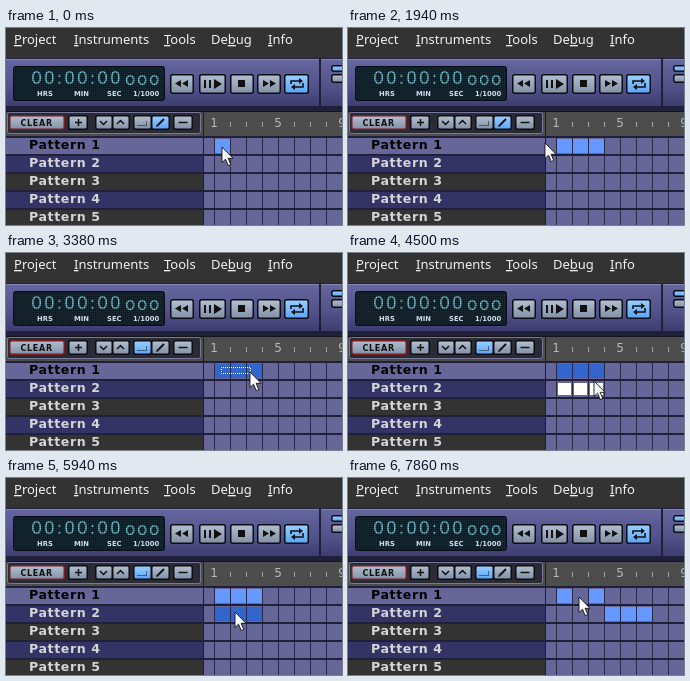
Animation of 336 by 197 pixels, one loop 8 s. Source, as an HTML page:

```html
<!DOCTYPE html>
<html lang="en">
<head>
<meta charset="utf-8">
<title>Pattern editor</title>
<style>
html, body { margin: 0; width: 100%; height: 100%; overflow: hidden; background: #333; }
svg { display: block; width: 336px; height: 197px; }
.menu { font: 13px "Noto Sans", "Open Sans", sans-serif; fill: #f2f2f2; }
.row { font: bold 12.6px "DejaVu Sans", sans-serif; letter-spacing: .6px; }
.label { font: bold 6.8px "DejaVu Sans", sans-serif; fill: #cfdcec; }
.clear { font: bold 8px "DejaVu Sans", sans-serif; letter-spacing: .7px; fill: #111; }
.bar { font: 12px "DejaVu Sans", sans-serif; fill: #b8b8b8; text-anchor: middle; }
.lcd { font-family: "DejaVu Sans", sans-serif; fill: url(#dots); }
</style>
</head>
<body>
<svg id="stage" viewBox="0 0 336 197" xmlns="http://www.w3.org/2000/svg">
  <defs>
    <linearGradient id="panel" x2="0" y2="1">
      <stop stop-color="#6666a0"/><stop offset=".6" stop-color="#525289"/><stop offset="1" stop-color="#3d3d70"/>
    </linearGradient>
    <linearGradient id="button" x2="0" y2="1">
      <stop stop-color="#b4c0d0"/><stop offset="1" stop-color="#8290a6"/>
    </linearGradient>
    <linearGradient id="active" x2="0" y2="1">
      <stop stop-color="#9cd0ff"/><stop offset="1" stop-color="#5aa4f8"/>
    </linearGradient>
    <pattern id="dots" width="2" height="2" patternUnits="userSpaceOnUse">
      <rect width="2" height="2" fill="#35767f"/><rect width="1.3" height="1.3" fill="#83d6dc"/>
    </pattern>
    <pattern id="mesh" width="2" height="2" patternUnits="userSpaceOnUse">
      <rect width="2" height="2" fill="#101c26"/><rect width="1" height="1" fill="#1c2d38"/>
    </pattern>
  </defs>
  <g id="base"></g>
  <g id="tools"></g>
  <g id="cells"></g>
  <rect id="lasso" fill="none" stroke="#fff" stroke-dasharray="1 1" stroke-dashoffset=".5"/>
  <path id="cursor" d="M0 0V15.5L3.5 12.2L6.2 18.6L8.8 17.5L6.1 11.3H11Z" fill="#fff" stroke="#111" stroke-width=".9" stroke-linejoin="round"/>
</svg>
<script>
const $ = id => document.getElementById(id);
const rect = (x, y, w, h, fill, extra = '') =>
  `<rect x="${x}" y="${y}" width="${w}" height="${h}" fill="${fill}" ${extra}/>`;
const text = (x, y, s, cls, extra = '') => `<text x="${x}" y="${y}" class="${cls}" ${extra}>${s}</text>`;
const path = (d, fill = '#111', extra = '') => `<path d="${d}" fill="${fill}" ${extra}/>`;
const line = (d, color = '#111', width = 1) => path(d, 'none', `stroke="${color}" stroke-width="${width}"`);
const button = (x, y, w, h, fill = 'url(#button)', edge = '#0c0c14') =>
  rect(x + .75, y + .75, w - 1.5, h - 1.5, fill, `rx="2" stroke="${edge}" stroke-width="1.5"`);

function menuBar() {
  const items = [[8, '', 'P', 'roject'], [68, '', 'I', 'nstruments'], [158, '', 'T', 'ools'],
    [205, 'De', 'b', 'ug'], [262, '', 'I', 'nfo']];
  return rect(0, 0, 336, 31, '#333') + items.map(([x, before, key, after]) =>
    text(x, 16, `${before}<tspan text-decoration="underline">${key}</tspan>${after}`, 'menu')).join('');
}

function player() {
  let out = rect(0, 30, 336, 53, '#20203a') + rect(0, 31, 313, 47, 'url(#panel)') +
    rect(0, 31, 313, 1, '#8585b6') + rect(315, 31, 21, 47, 'url(#panel)') +
    rect(315, 31, 21, 1, '#8585b6');
  out += rect(7.5, 38.5, 151, 34, 'url(#mesh)', 'rx="2" stroke="#080d18"') +
    text(25, 56, '00:00:00', 'lcd', 'font-size="17.5" letter-spacing="1.6"') +
    text(119, 57, 'ooo', 'lcd', 'font-size="17" letter-spacing="1.6"');
  [[31, 'HRS'], [68, 'MIN'], [101, 'SEC'], [127, '1/1000']].forEach(([x, s]) => out += text(x, 68, s, 'label'));

  [[164, 24], [193, 27], [224, 24], [251, 24], [278, 25]].forEach(([x, w], i) =>
    out += button(x, 46, w, 20, i === 4 ? 'url(#active)' : 'url(#button)'));
  out += path('M175 52v7l-6-3.500zM182 52v7l-6-3.500z') +
    path('M198 52h2v8h-2zM203 52h2v8h-2zM208 51v10l8-5z') +
    rect(232, 52, 7, 7, '#111') +
    path('M257 52v7l6-3.500zM264 52v7l6-3.500z') +
    line('M285 56v-3h9M297 55v4h-9', '#111', 1.6) +
    path('M293 50l4 3l-4 3zM289 56l-4 3l4 3z');
  return out + button(325, 37, 16, 7, 'url(#active)') + button(325, 46, 16, 9);
}

function toolbar() {
  return rect(0, 83, 197, 26, '#4d4d4d') + rect(0, 83, 336, 1, '#15151f') +
    rect(1.5, 84.5, 193, 21, '#2b2b36', 'rx="2" stroke="#77779a"') +
    button(3, 87, 56, 15, 'url(#button)', '#7a1c22') + text(14.5, 98, 'CLEAR', 'clear') +
    button(62, 87, 20, 15) + line('M69 94.5h7M72.500 91v7', '#111', 1.5) +
    button(89, 87, 18, 15) + button(106, 87, 18, 15) +
    line('M94 93l3.500 3.500l3.500-3.500M111 96l3.500-3.500l3.500 3.500', '#111', 1.5) +
    button(167, 87, 20, 15) + line('M172.500 94.5h9', '#111', 1.5);
}

function rows() {
  let out = '';
  for (let i = 0; i < 5; i++) {
    const y = 109 + 18 * i;
    out += rect(0, y, 197, 18, i ? (i % 2 ? '#333366' : '#333') : '#666699') +
      text(23, y + 12, 'Pattern ' + (i + 1), 'row', `fill="${i ? '#d5d5d8' : '#000'}"`);
  }
  return out;
}

function grid() {
  let out = rect(197, 84, 139, 25, '#4d4d4d') + rect(197, 109, 139, 88, '#666699') + rect(197, 84, 1, 113, '#1d1d2c');
  for (let i = 0; i < 9; i++) {
    const x = 208 + 16 * i;
    out += rect(x, 110, 1, 87, '#29294a');
    out += i % 4 ? rect(x, 94, 1, 5, '#a0a0a0') : text(x, 99, i + 1, 'bar');
  }
  for (let y = 108; y < 197; y += 18) out += rect(0, y, 336, 2, '#20203a');
  return out;
}

$('base').innerHTML = menuBar() + player() + toolbar() + rows() + grid();

// time, x, y of the pointer tip
const route = [
  [0, 216, 119], [340, 216, 119], [660, 230, 118], [980, 232, 118], [1300, 246, 118], [1620, 249, 117],
  [1940, 197, 115], [2100, 170, 106], [2260, 150, 99], [2580, 145, 98],
  [3060, 215, 114], [3380, 244, 119], [3700, 246, 118], [3860, 246, 117], [4020, 246, 117],
  [4500, 246, 128], [4660, 246, 130], [4820, 246, 130], [5140, 247, 132], [5460, 215, 138],
  [5620, 214, 138], [5940, 229, 134], [6100, 231, 134], [6580, 268, 133], [6740, 274, 133],
  [6900, 274, 132], [7060, 272, 132], [7540, 235, 120], [7700, 231, 119], [8000, 231, 119]
];

function pointer(t) {
  const i = route.findIndex(p => p[0] > t);
  const [t0, x0, y0] = route[i - 1], [t1, x1, y1] = route[i];
  const k = (t - t0) / (t1 - t0);
  return [x0 + (x1 - x0) * k, y0 + (y1 - y0) * k].map(Math.round);
}

// Rubber bands: start and release time, and the corner where each begins
const lassos = [
  { from: 3060, to: 3540, x: 215, y: 114 },
  { from: 5140, to: 5620, x: 247, y: 132 }
];

const LIT = '#6699ff', PICKED = '#3366cc', GHOST = '#fff';
const cell = (col, row, fill) => rect(209 + 16 * col, 111 + 18 * row, 15, 14, fill);
const ghosts = (col, row) => [0, 1, 2].map(i =>
  rect(210 + 16 * (col + i), 112 + 18 * row, 13, 12, GHOST)).join('');

// A cell is picked once the band reaches it, and until the drag is dropped.
function isPicked(col, band, dropped, t, x) {
  if (t < band.from || t >= dropped) return false;
  const left = 209 + 16 * col;
  return t >= band.to || Math.max(x, band.x) >= left && Math.min(x, band.x) < left + 15;
}

function cellsAt(t, x, y) {
  const copied = 4660, moved = 6900, erased = 7700;
  let out = '';
  for (let i = 0; i < 3; i++) {
    if (t >= [0, 820, 1300][i] && !(i === 1 && t >= erased))
      out += cell(i, 0, isPicked(i, lassos[0], copied, t, x) ? PICKED : LIT);
    if (t >= copied)
      out += cell(t < moved ? i : i + 3, 1, isPicked(i, lassos[1], moved, t, x) ? PICKED : LIT);
  }
  if (t > 4020 && t < copied && y > 125) out += ghosts(0, 1);
  const shift = Math.round((x - 229) / 16);
  if (t >= 6100 && t < moved && shift) out += ghosts(shift, 1);
  return out;
}

function toolsAt(selecting) {
  return button(127, 87, 19, 15, selecting ? 'url(#active)' : 'url(#button)') +
    button(145, 87, 19, 15, selecting ? 'url(#button)' : 'url(#active)') +
    path('M131.500 97.500h9v-5', 'none', 'stroke="#111" stroke-dasharray="1 1"') +
    line('M152 97l6-6', '#111', 2) + path('M150 99l1-3l2 2z');
}

function drawLasso(t, x, y) {
  const band = lassos.find(b => t > b.from && t < b.to);
  $('lasso').setAttribute('visibility', band ? 'visible' : 'hidden');
  if (!band) return;
  const box = {
    x: Math.min(x, band.x) + .5, y: Math.min(y, band.y) + .5,
    width: Math.abs(x - band.x), height: Math.abs(y - band.y) + 1
  };
  for (const key in box) $('lasso').setAttribute(key, box[key]);
}

function draw(t) {
  // The picture advances in steps of 160 ms after the first half second.
  const step = t < 500 ? 0 : 500 + 160 * Math.floor((t - 500) / 160);
  const [x, y] = pointer(step);
  $('tools').innerHTML = toolsAt(step >= 2420);
  $('cells').innerHTML = cellsAt(step, x, y);
  drawLasso(step, x, y);
  $('cursor').setAttribute('transform', `translate(${x} ${y})`);
}

const start = performance.now();
function frame() {
  draw((performance.now() - start) % 8000);
  requestAnimationFrame(frame);
}
frame();
</script>
</body>
</html>
```
